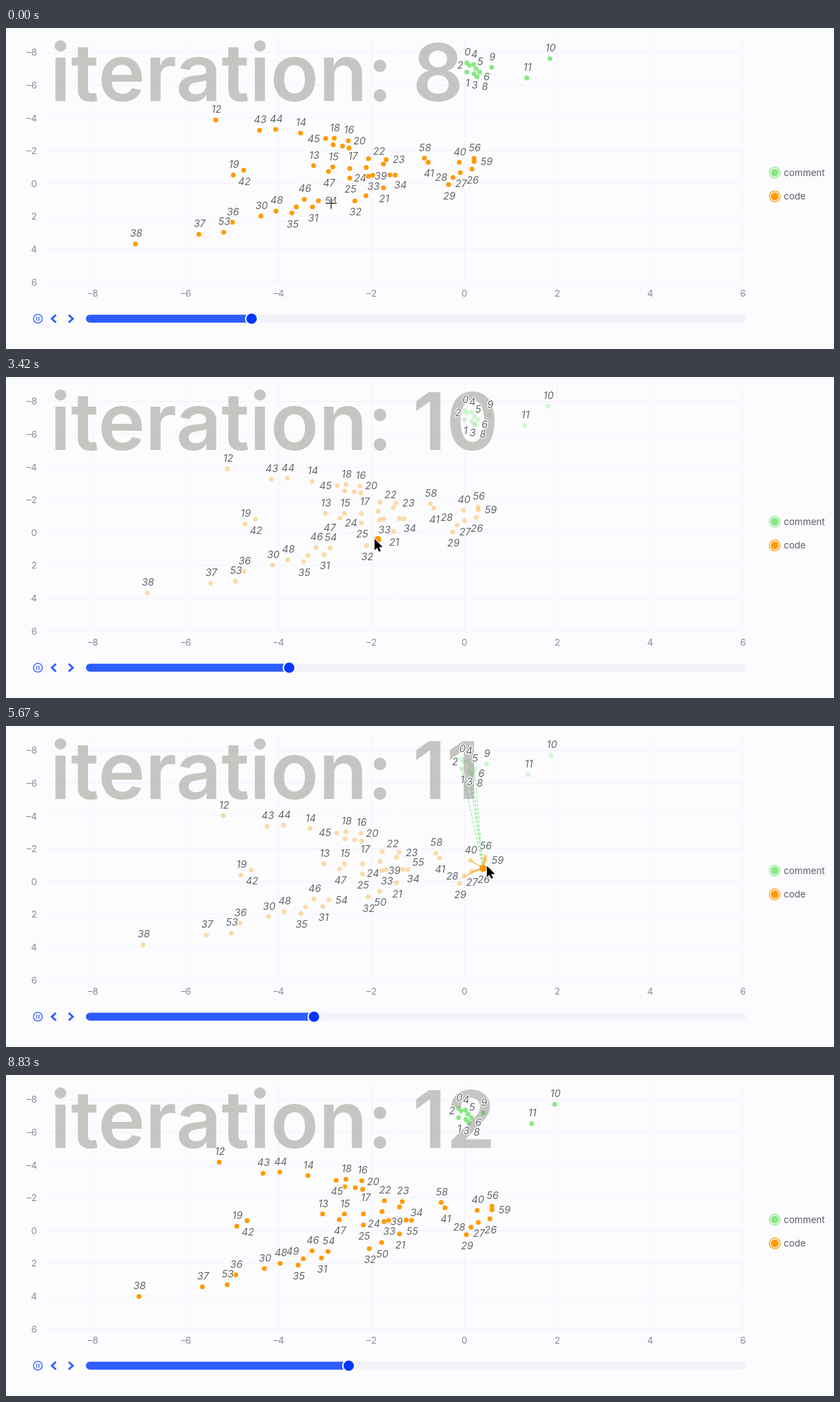
An HTML page with a canvas for the animation above (8.91 s loop, 1202 by 466 pixels).

```html
<!DOCTYPE html>
<html lang="en">
<head>
<meta charset="utf-8">
<title>Scatter by iteration</title>
<style>
  html, body { margin: 0; width: 100%; height: 100%; overflow: hidden; background: #fcfcff; }
  canvas { display: block; }
</style>
</head>
<body>
<canvas id="stage" width="1202" height="466"></canvas>
<script>
const ctx = document.getElementById('stage').getContext('2d');
const LOOP = 8910, STEP = 2000, FIRST = 920;
const FONT = 'Inter, "Noto Sans", sans-serif';
const GREEN = '#87e885', ORANGE = '#ff9a00', BLUE = '#2c5cff', BG = '#fcfcff';

// x, y of every dot at iteration 10, in id order; the other iterations drift from here
const home = [
  666,48.5, 666,62, 669.5,52, 676.5,64.5, 676,51, 684.5,62, 680.5,68.5, 679.5,57, 681,69, 702,55,
  786.5,42.5, 753,70.5, 321.5,133.5, 463.5,198, 444.5,151.5, 491.5,198, 514,158, 505.5,166.5,
  493.5,156, 347,213.5, 515,168.5, 562.5,224, 543,182, 566,183, 516,198, 516,212, 682.5,204,
  665.5,208.5, 655,215, 648.5,225, 387,273, 462,258, 523.5,244.5, 548.5,206, 571,205.5, 432,268,
  345.5,282, 297,299.5, 205,313.5, 542.5,207.5, 664,193.5, 621,190.5, 362,206.5, 385,148.5,
  408.5,147, 481,157.5, 450,247.5, 485,205, 409,265.5, 438.5,259, 539.5,236, 540,195, 562.5,189.5,
  333,296.5, 470.5,248.5, 578,206, 685.5,188.5, 492,165.5, 616,184, 685.5,193
];
const COMMENTS = 12;

const hovers = [
  { from: 2500, to: 3640, id: 50, links: [] },
  { from: 5250, to: 6080, id: 26, links: [27, 28, 40, 56, 59, 1, 3, 5, 6] },
  { from: 7960, to: 8120, id: 54, links: [] }
];

// time, x, y
const pointerPath = [
  [0, 472, 254], [170, 472, 254], [500, 466, 247], [830, 470, 246], [2330, 544, 266], [2500, 532, 238],
  [3420, 535, 235], [3640, 540, 243], [4830, 700, 195], [5670, 698, 203], [6080, 701, 207],
  [6880, 854, 183], [7330, 487, 275], [7830, 487, 275], [8000, 471, 258], [8170, 479, 286],
  [8330, 479, 286]
];

const ramp = (v, a, b) => Math.min(1, Math.max(0, (v - a) / (b - a)));

// Before iteration 10 the cloud moves right and up; after it, it spreads outwards.
function drift(id, n) {
  const x = home[id * 2], y = home[id * 2 + 1];
  let dx, dy;
  if (id < COMMENTS) {
    dx = n < 0 ? -1.5 : x < 730 ? -4.5 : 5;
    dy = n < 0 ? -1 : 0;
  } else if (n < 0) {
    dx = 8.5 - 5.5 * ramp(x, 540, 640);
    dy = -4 * Math.exp(-(((x - 560) / 80) ** 2));
  } else {
    dx = -6 + 16 * ramp(x, 400, 650);
    dy = 4 * Math.tanh((y - 180) / 35);
  }
  return [x + dx * n, y + dy * n];
}

// Each label takes the first free side of its dot and is left out when none is free.
function placeLabels(dots) {
  const placed = [], halfH = 6.9, dotHalf = 3.2;
  dots.forEach(([x, y], id) => {
    const half = id > 9 ? 8.2 : 4.2, side = half + 7;
    const spots = [
      [1, -15.5], [1, 16], [half + 10, 0], [-half - 9, 0],
      [side, -11], [side, 14], [-side, -11.5], [-side, 14]
    ];
    const free = ([dx, dy]) => {
      const lx = x + dx, ly = y + dy;
      return placed.every(p => Math.abs(p.x - lx) >= p.half + half || Math.abs(p.y - ly) >= halfH * 2)
        && dots.every(d => Math.abs(d[0] - lx) >= half + dotHalf || Math.abs(d[1] - ly) >= halfH + dotHalf);
    };
    const spot = spots.find(free);
    if (spot) placed.push({ id, half, x: x + spot[0], y: y + spot[1] });
  });
  return placed;
}

const scenes = [-2, -1, 0, 1, 2].map(n => {
  const dots = Array.from({ length: home.length / 2 }, (_, id) => drift(id, n));
  return { title: `iteration: ${10 + n}`, dots, labels: placeLabels(dots) };
});

const dotColor = id => id < COMMENTS ? GREEN : ORANGE;

function circle(x, y, r, fill, stroke, width) {
  ctx.beginPath();
  ctx.arc(x, y, r, 0, Math.PI * 2);
  if (fill) { ctx.fillStyle = fill; ctx.fill(); }
  if (stroke) { ctx.strokeStyle = stroke; ctx.lineWidth = width; ctx.stroke(); }
}

function line(points, color, width) {
  ctx.beginPath();
  points.forEach(([x, y]) => ctx.lineTo(x, y));
  ctx.strokeStyle = color;
  ctx.lineWidth = width;
  ctx.stroke();
}

function pill(x, y, w, h, color) {
  ctx.beginPath();
  ctx.roundRect(x, y, w, h, h / 2);
  ctx.fillStyle = color;
  ctx.fill();
}

function text(str, x, y, size, color, align, style = '') {
  ctx.font = `${style} ${size}px ${FONT}`;
  ctx.textAlign = align;
  ctx.fillStyle = color;
  ctx.fillText(str, x, y);
}

function drawLabel({ id, x, y }) {
  const size = 14.5, base = y + size * 0.36;
  ctx.font = `italic ${size}px ${FONT}`;
  ctx.textAlign = 'center';
  ctx.lineJoin = 'round';
  ctx.lineWidth = 2.5;
  ctx.strokeStyle = '#fff';
  ctx.strokeText(id, x, base);
  ctx.fillStyle = '#62646a';
  ctx.fillText(id, x, base);
}

function drawAxes() {
  for (let v = -8; v <= 6; v += 2) {
    const x = 665.6 + v * 67.4, y = 225.9 + v * 23.8;
    const name = String(v).replace('-', '–');
    line([[x, 12], [x, 368.5]], '#f1f1fc', 1);
    line([[59, y], [1070, y]], '#f1f1fc', 1);
    text(name, 45, y + 4.9, 13.5, '#898b99', 'right');
    text(name, x, 390, 13.5, '#898b99', 'center');
  }
}

function drawLinks(dots, { id, links }) {
  for (const other of links) {
    ctx.setLineDash(other < COMMENTS ? [4, 2] : []);
    line([dots[id], dots[other]], dotColor(other), 1);
  }
  ctx.setLineDash([]);
}

function drawDots(dots, hover) {
  dots.forEach(([x, y], id) => {
    const active = hover && hover.id === id;
    ctx.globalAlpha = hover && !active ? 0.35 : 1;
    circle(x, y, active ? 5.3 : 3.5, dotColor(id));
  });
  ctx.globalAlpha = 1;
}

function drawLegend() {
  [['comment', 210, GREEN], ['code', 244.5, ORANGE]].forEach(([name, y, color]) => {
    circle(1116, y, 7.8, '#fff', color, 1.3);
    circle(1116, y, 5.8, color);
    text(name, 1129, y + 4.9, 13.5, '#5d606a', 'left');
  });
}

function drawPlayer(t) {
  const x = 356.5 + t * 0.01597;
  circle(46.3, 422, 6.4, null, BLUE, 1.3);
  line([[44.7, 419], [44.7, 425]], BLUE, 1.2);
  line([[47.9, 419], [47.9, 425]], BLUE, 1.2);
  ctx.lineJoin = 'miter';
  line([[72.5, 416.5], [66.5, 422], [72.5, 427.5]], BLUE, 2.8);
  line([[91, 416.5], [97, 422], [91, 427.5]], BLUE, 2.8);
  pill(116, 416.3, 958, 11.4, '#f2f2f9');
  pill(116, 416.3, x - 116, 11.4, BLUE);
  circle(x, 422, 8.6, '#0237ff', '#fff', 2);
}

function pointerAt(t) {
  if (t >= 8330) return t < 8580 ? [1156, 452] : null;
  const i = pointerPath.findIndex(p => p[0] > t);
  const [t0, x0, y0] = pointerPath[i - 1], [t1, x1, y1] = pointerPath[i];
  const k = ramp(t, t0, t1);
  return [x0 + (x1 - x0) * k, y0 + (y1 - y0) * k];
}

function drawPointer(t) {
  const pos = pointerAt(t);
  if (!pos) return;
  ctx.save();
  ctx.translate(...pos);
  if (t < FIRST) {
    for (const [color, width] of [['#fff', 3], ['#222', 1.3]]) {
      line([[-8, 0.5], [8, 0.5]], color, width);
      line([[0, -7.5], [0, 8.5]], color, width);
    }
  } else {
    ctx.beginPath();
    [[0, 0], [0, 16.5], [3.8, 13], [6.3, 18.7], [9, 17.5], [6.6, 12], [11.7, 11.7]]
      .forEach(([x, y]) => ctx.lineTo(x, y));
    ctx.closePath();
    ctx.lineJoin = 'round';
    ctx.lineWidth = 2;
    ctx.strokeStyle = '#fff';
    ctx.stroke();
    ctx.fillStyle = '#000';
    ctx.fill();
  }
  ctx.restore();
}

function draw(t) {
  const step = Math.max(0, Math.floor((t - FIRST) / STEP) + 1);
  const { title, dots, labels } = scenes[step];
  const hover = hovers.find(h => t >= h.from && t < h.to);
  ctx.fillStyle = BG;
  ctx.fillRect(0, 0, 1202, 466);
  drawAxes();
  if (hover) drawLinks(dots, hover);
  drawDots(dots, hover);
  text(title, 64, 106, 115.3, 'rgba(142,142,133,0.5)', 'left', '600');
  labels.forEach(drawLabel);
  drawLegend();
  drawPlayer(t);
  drawPointer(t);
}

function tick(now) {
  draw(now % LOOP);
  requestAnimationFrame(tick);
}
draw(0);
requestAnimationFrame(tick);
</script>
</body>
</html>
```
